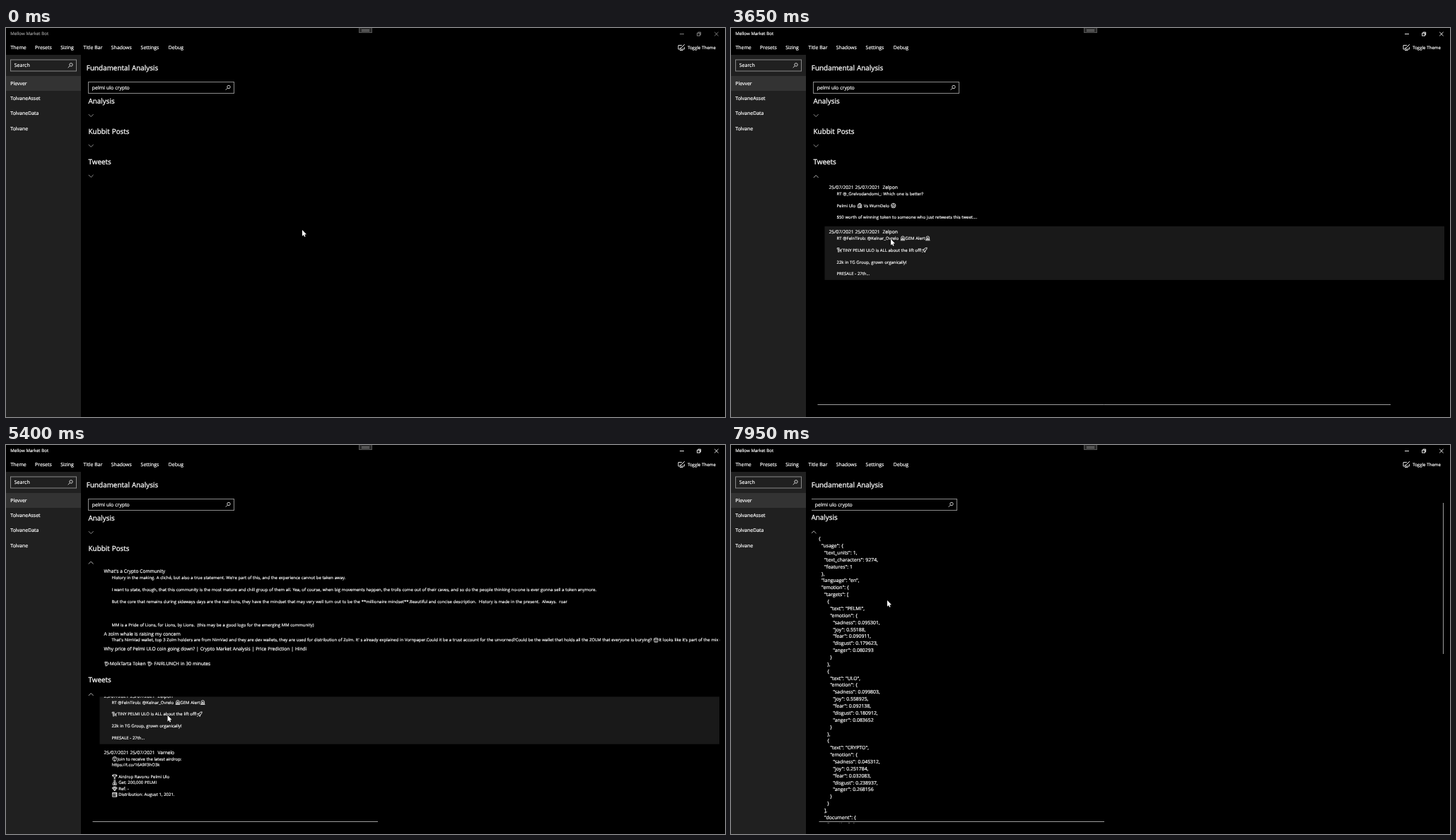
Animation of 1017x551 px, one loop 8000 ms. Source, as an HTML page with a canvas:

```html
<!DOCTYPE html>
<html lang="en">
<head>
<meta charset="utf-8">
<title>Mellow Market Bot</title>
<style>
  html, body { margin: 0; width: 100%; height: 100%; overflow: hidden; background: #000; }
  canvas { display: block; width: 1017px; height: 551px; }
</style>
</head>
<body>
<canvas id="stage"></canvas>
<script>
const W = 1017, H = 551, LOOP = 8000, STEP = 50;
const canvas = document.getElementById('stage');
const ctx = canvas.getContext('2d');
const dpr = window.devicePixelRatio || 1;
canvas.width = W * dpr;
canvas.height = H * dpr;

const SIZE = { small: 5.96, title: 6.6, bar: 6.1, menu: 6.95, json: 6.9, head: 9.9 };
const LINE = 8.45;

// Symbols are drawn in an 8 by 8 box.
const ICONS = {
  siren: 'M.6 7H7M1.5 6.4V3.6Q1.5 1.2 3.8 1.2T6.1 3.6V6.4M2.6 4H5M3.8 3V6.2M1.5 5.6H6',
  dog: 'M.5 1H3.4L2.4 3.4M2 3.4H6L7.5 1.8M2 3.4V7M6 3.4V7M3.2 5H5.6M.6 1V2.6L2 3.6M3.2 7V5.4',
  rocket: 'M7.5 .5L4.6 1.2L2.2 4.2L3.8 5.8L6.8 3.4ZM3.4 2.8L.8 3.6L2 4.4M5.2 4.6L4.4 7.2L3.6 6M2 5.8L.6 7.4M4.6 3.4H5.2',
  bag: 'M1.4 2.6H6.6V7H1.4ZM2.8 2.6V1H5.2V2.6M3 4V6M4.2 4V6.4M5.4 3.6V6',
  ball: 'M.8 4A3.2 3.2 0 1 0 7.2 4A3.2 3.2 0 1 0 .8 4M4 2.6L5.4 3.8L4.8 5.4H3.2L2.6 3.8ZM4 .9V2.4M1 3.6H2.4M5.6 3.6H7M3 5.6L2.2 6.6M5 5.6L5.8 6.6',
  dish: 'M1 4A3 3 0 1 1 7 4Q6.8 5.4 5.6 6.4M2.4 4A1.6 1.6 0 1 1 5.6 4M4 4V7M2.4 7H5.6M1 4L2.2 6.4',
  cup: 'M2.2 1H5.8V3.4Q5.8 4.8 4 4.8T2.2 3.4ZM2.2 1.6H.8V3H2.2M5.8 1.6H7.2V3H5.8M4 4.8V7M2.6 7H5.4M3.4 2.8H4.6',
  money: 'M3 .8H5L4.6 2.4Q7 4 6.6 7H1.4Q1 4 3.4 2.4ZM4.8 3.8H3.4V5H4.6V6H3.2M4 3.2V6.6',
  gem: 'M2 1.4H6L7.5 3.2L4 7.2L.5 3.2ZM.5 3.2H7.5M2.6 3.2L4 7L5.4 3.2L4 1.4Z',
  date: 'M.9 1.2H7.1V7H.9ZM.9 2.6H7.1M2.2 4H3.6M4.6 4H6M2.2 5.6H3.6M4.8 5.6H7M6.4 1.2V6.8',
  slice: 'M1 1.2Q6 .2 6.8 4L2.4 7ZM2 2.4Q5 2 5.6 4M3 3.8H3.8M3.2 5.2H4',
  pot: 'M1 3H7L6.2 7H1.8ZM.8 2.2Q4 .2 7.2 2.2M2.8 4.4H3.2M4.8 4.4H5.2M3 5.8H5'
};
for (const name in ICONS) ICONS[name] = new Path2D(ICONS[name]);

const STAMP = '25/07/2021 25/07/2021  ';
const TWEETS = [
  [STAMP + 'Zelpon', 'RT @FelnTirob: @brelno @dovela <siren>GEM Alert<siren>', '',
    '<dog><dog>TINY PELMI ULO is ALL about the lift off! <rocket><rocket>', '',
    '22k in TG Group, grown organically!', '', 'PRESALE -...'],
  [STAMP + 'Zelpon', 'RT @_Grelvodandomi_: Which one is better?', '',
    'Pelmi Ulo <bag> Vs WurnDelo <ball>', '',
    '$50 worth of winning token to someone who just retweets this tweet....'],
  [STAMP + 'Zelpon', 'RT @FelnTirob: @Kelnar_Ovrelo <siren>GEM Alert<siren>', '',
    '<dog>TINY PELMI ULO is ALL about the lift off!<rocket>', '',
    '22k in TG Group, grown organically!', '', 'PRESALE - 27th...'],
  [STAMP + 'Varnelo', '<dish>Join to receive the latest airdrop:', 'https://t.co/16A9F3hO3k', '',
    '<cup> Airdrop Ravonu Pelmi Ulo', '<money> Get: 200,000 PELMI', '<gem> Ref: -',
    '<date> Distribution: August 1, 2021.']
];

const POSTS = [
  [179, "What's a Crypto Community",
    "History in the making. A cliché, but also a true statement. We're part of this, and the experience cannot be taken away.", '',
    'I want to state, though, that this community is the most mature and chill group of them all. Yea, of course, when big movements happen, the trolls come out of their caves, and so do the people thinking no-one is ever gonna sell a token anymore.', '',
    'But the core that remains during sideways days are the real lions, they have the mindset that may very well turn out to be the **millionaire mindset**.Beautiful and concise description.  History is made in the present.  Always.  roar', '', '', '',
    'MM is a Pride of Lions, for Lions, by Lions.  (this may be a good logo for the emerging MM community)'],
  [267.3, 'A zolm whale is raising my concern',
    "That's NimVad wallet, top 3 Zolm holders are from NimVad and they are dev wallets, they are used for distribution of Zolm. It' s already explained in Vornpaper.Could it be a trust account for the unvorned?Could be the wallet that holds all the ZOLM that everyone is burying? <pot>It looks like it's part of the mix of holders"],
  [288.6, 'Why price of Pelmi ULO coin going down? | Crypto Market Analysis | Price Prediction | Hindi'],
  [309.8, '<slice>MolkTarta Token <slice> FAIRLUNCH in 30 minutes']
];

const mood = (sadness, joy, fear, disgust, anger) => ({ sadness, joy, fear, disgust, anger });
const REPORT = JSON.stringify({
  usage: { text_units: 1, text_characters: 9274, features: 1 },
  language: 'en',
  emotion: {
    targets: [
      { text: 'PELMI', emotion: mood(0.095301, 0.55188, 0.090911, 0.179623, 0.080293) },
      { text: 'ULO', emotion: mood(0.099803, 0.558925, 0.092138, 0.180912, 0.083652) },
      { text: 'CRYPTO', emotion: mood(0.045312, 0.251784, 0.032083, 0.238937, 0.268156) }
    ],
    document: { emotion: mood(0.08, 0.46, 0.07, 0.2, 0.14) }
  }
}, null, 1).split('\n');

// Pointer stops: time, x, y
const PATH = [
  [0, 419, 286], [250, 398, 278], [400, 398, 278], [900, 230, 190], [1250, 120, 120],
  [1700, 120, 120], [1900, 124, 209], [2050, 124, 209], [2400, 190, 262], [2850, 106, 165],
  [2900, 106, 165], [3250, 215, 285], [3650, 226, 299], [3750, 226, 299], [4150, 205, 270],
  [4600, 119, 165], [4700, 121, 167], [4800, 137, 190], [5150, 200, 300], [5500, 240, 416],
  [5550, 240, 417], [5850, 211, 343], [6350, 148, 173], [6400, 145, 167], [6850, 118, 122],
  [7250, 118, 122], [7750, 214, 232], [7950, 221, 220]
];
const NOTCHES = [3250, 3350, 3450, 3850, 3950, 4050];
const AT = { active: 1300, tweets: 2050, posts: 4750, report: 6950 };

function pointer(t) {
  const i = PATH.findIndex(p => p[0] > t);
  if (i < 0) return PATH[PATH.length - 1].slice(1);
  const [t0, x0, y0] = PATH[i - 1], [t1, x1, y1] = PATH[i];
  const k = (t - t0) / (t1 - t0);
  return [x0 + (x1 - x0) * k, y0 + (y1 - y0) * k];
}

function box(x, y, w, h, fill, stroke) {
  if (fill) { ctx.fillStyle = fill; ctx.fillRect(x, y, w, h); }
  if (stroke) { ctx.strokeStyle = stroke; ctx.lineWidth = 1; ctx.strokeRect(x, y, w, h); }
}

function line(color, width, ...pts) {
  ctx.strokeStyle = color;
  ctx.lineWidth = width;
  ctx.beginPath();
  for (let i = 0; i < pts.length; i += 2) ctx.lineTo(pts[i], pts[i + 1]);
  ctx.stroke();
}

function clipped(x, y, w, h, draw) {
  ctx.save();
  ctx.beginPath();
  ctx.rect(x, y, w, h);
  ctx.clip();
  draw();
  ctx.restore();
}

function icon(name, x, base) {
  ctx.save();
  ctx.translate(x + 0.2, base - 6);
  ctx.strokeStyle = '#fff';
  ctx.lineWidth = 0.8;
  ctx.stroke(ICONS[name]);
  ctx.restore();
  return name === 'siren' ? 7.4 : 8.2;
}

// y is the middle of the capitals; <name> places a symbol.
function text(str, x, y, size, color = '#fff') {
  const base = y + 0.36 * size, k = size / 100;
  str.split(/<(\w+)>/).forEach((part, i) => {
    if (i % 2) { x += icon(part, x, base); return; }
    ctx.save();
    ctx.translate(x, base);
    ctx.scale(k, k);
    ctx.fillStyle = ctx.strokeStyle = color;
    ctx.lineWidth = 3;
    ctx.lineJoin = 'round';
    ctx.fillText(part, 0, 0);
    ctx.strokeText(part, 0, 0);
    x += ctx.measureText(part).width * k;
    ctx.restore();
  });
}

function lens(x, y) {
  ctx.strokeStyle = '#ddd';
  ctx.lineWidth = 0.9;
  ctx.beginPath();
  ctx.arc(x + 1, y - 1, 2.2, 0, 7);
  ctx.stroke();
  line('#ddd', 0.9, x - 0.6, y + 0.6, x - 3.3, y + 3.3);
}

function searchBox(x, y, w, str) {
  box(x + 0.5, y + 0.5, w - 1, 16, null, '#8a8a8a');
  text(str, x + 5.8, y + 8.4, SIZE.menu);
  lens(x + w - 9, y + 8.5);
}

function chevron(x, y, open, [mx, my]) {
  const hover = mx >= 105 && my >= y - 11 && my <= y + 4;
  const d = open ? -1.7 : 1.7;
  line(hover ? '#4c4c4c' : open ? '#b4b4b4' : '#929292', 1, x - 3.4, y - d, x, y + d, x + 3.4, y - d);
}

function section(name, x, y, open, mouse) {
  text(name, x, y, SIZE.head);
  chevron(x + 3.7, y + 20.6, open, mouse);
}

function entry([title, ...lines], y) {
  text(title, 138.6, y, SIZE.title);
  lines.forEach((s, i) => s && text(s, 149.5, y + 8.7 + i * LINE, SIZE.small));
}

function rowGlow(top, bottom, [mx, my]) {
  if (mx >= 132 && my >= top && my < bottom) box(132.5, top, 876.5, bottom - top, '#191919');
}

function tweetList(top, scroll, mouse) {
  clipped(114, top, 895.5, 143.5, () => {
    const inside = mouse[1] >= top && mouse[1] < top + 143.5;
    let y = top + 8.5 - scroll;
    for (const tweet of TWEETS) {
      const pitch = 20.85 + LINE * (tweet.length - 1);
      if (inside) rowGlow(y - 8, y - 8 + pitch - 4, mouse);
      entry(tweet, y);
      y += pitch;
    }
  });
}

function postList(mouse, glow) {
  clipped(114, 170, 895.5, 154, () => {
    POSTS.forEach(([y, ...post], i) => {
      const next = i + 1 < POSTS.length ? POSTS[i + 1][0] : 331;
      if (glow) rowGlow(y - 8, next - 8, mouse);
      entry(post, y);
    });
  });
}

function frame(active) {
  const tone = active ? '#fff' : '#8c8c8c';
  text('Mellow Market Bot', 6.3, 8.2, SIZE.bar, active ? '#fff' : '#999');
  line(tone, 0.9, 953, 8.5, 959, 8.5);
  ctx.lineWidth = 0.9;
  ctx.strokeStyle = tone;
  ctx.strokeRect(977.7, 7.2, 3.8, 3.8);
  line(tone, 0.9, 979, 6.9, 979, 6, 982.7, 6, 982.7, 9.7, 981.8, 9.7);
  line(tone, 0.9, 1002.2, 5.8, 1007.6, 11.2);
  line(tone, 0.9, 1007.6, 5.8, 1002.2, 11.2);

  box(499.5, -0.5, 18, 7, '#2b2b2b', '#555');
  line('#8a8a8a', 0.8, 503, 2.6, 514, 2.6);
  line('#8a8a8a', 0.8, 503, 4.4, 514, 4.4);

  const menu = { Theme: 6.4, Presets: 41, Sizing: 77.2, 'Title Bar': 109.6, Shadows: 148.8, Settings: 190.6, Debug: 229.8 };
  for (const name in menu) text(name, menu[name], 27.8, SIZE.menu);
  line('#fff', 0.9, 956, 24.6, 951, 24.6, 951, 30, 959.4, 30, 959.4, 27);
  line('#fff', 1, 959.8, 23.2, 955, 28.2, 953.2, 28.6);
  line('#fff', 0.9, 953, 31.6, 957.6, 31.6);
  text('Toggle Theme', 964.2, 27.6, SIZE.bar);

  box(0, 38, 106, 513, '#202020');
  searchBox(6, 44.5, 94, 'Search');
  box(0, 68, 106, 21, '#333');
  ['Plevver', 'TolvaneAsset', 'TolvaneData', 'Tolvane'].forEach((s, i) =>
    text(s, 6.3, 78.4 + i * 21.2, SIZE.menu));
}

function arrow([x, y]) {
  ctx.beginPath();
  [[0, 0], [0, 8.8], [2, 7], [3.2, 9.8], [4.6, 9.2], [3.4, 6.5], [6, 6.3]]
    .forEach(([a, b]) => ctx.lineTo(x + a, y + b));
  ctx.closePath();
  ctx.strokeStyle = '#000';
  ctx.lineWidth = 1;
  ctx.stroke();
  ctx.fillStyle = '#fff';
  ctx.fill();
}

function content(t, mouse) {
  text('Fundamental Analysis', 113.8, 56.2, SIZE.head);
  const open = { tweets: t >= AT.tweets, posts: t >= AT.posts, report: t >= AT.report };
  if (open.report) {
    clipped(114, 70, 903, 465.5, () => {
      searchBox(113, 76, 207, 'pelmi ulo crypto');
      section('Analysis', 113.4, 102.9, true, mouse);
      REPORT.forEach((s, i) => {
        const level = s.search(/\S/);
        text(s.slice(level), 124 + 4.05 * level, 132.8 + i * 9.867, SIZE.json);
      });
    });
    line('#9c9c9c', 1, 124.5, 533.5, 528, 533.5);
    line('#9c9c9c', 1, 1007.5, 82, 1007.5, 296);
    return;
  }
  searchBox(116, 76, 207, 'pelmi ulo crypto');
  section('Analysis', 116.5, 103.3, false, mouse);
  section('Kubbit Posts', 116.5, 146.2, open.posts, mouse);
  const shift = open.posts ? 143 : 0;
  section('Tweets', 116.5, 189.1 + (open.tweets ? 0.6 : 0) + shift, open.tweets, mouse);
  if (open.posts) postList(mouse, t > AT.posts + STEP);
  if (open.tweets) {
    const scroll = NOTCHES.filter(n => t >= n).length * 25.4;
    tweetList(213.5 + shift, scroll, mouse);
    line('#9c9c9c', 1, 122.5, 533.5, open.posts ? 526 : 933, 533.5);
  }
}

function draw(t) {
  const mouse = pointer(t);
  ctx.setTransform(dpr, 0, 0, dpr, 0, 0);
  ctx.font = '100px "Open Sans", "Noto Sans", sans-serif';
  ctx.wordSpacing = '3.3px';
  ctx.textRendering = 'geometricPrecision';
  box(0, 0, W, H, '#000');
  frame(t >= AT.active);
  content(t, mouse);
  arrow(mouse);
}

const start = performance.now();
function tick() {
  const t = (performance.now() - start) % LOOP;
  draw(Math.floor(t / STEP) * STEP);
  requestAnimationFrame(tick);
}
tick();
</script>
</body>
</html>
```
